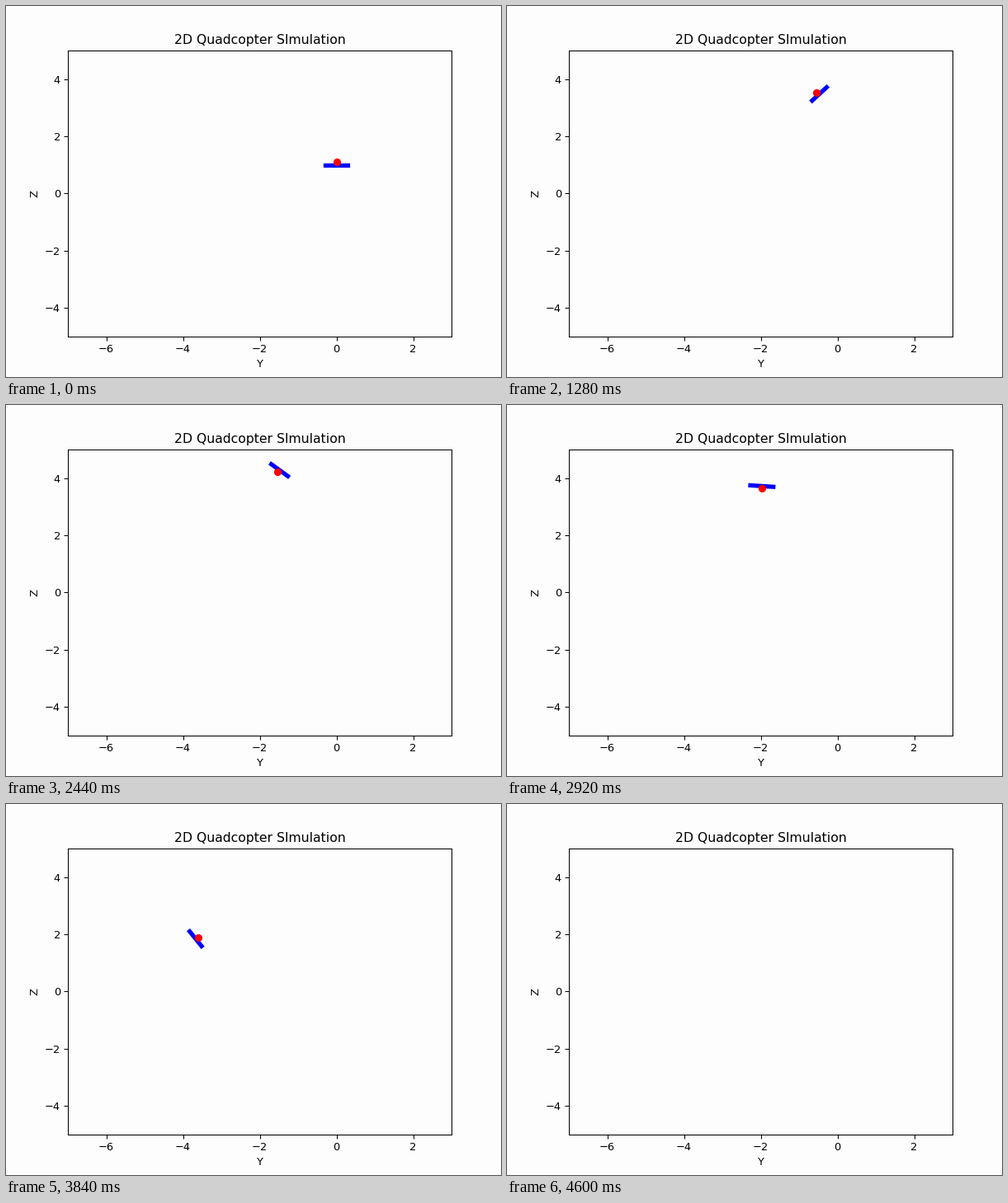
A matplotlib script for the animation above (5200 ms loop, 600 by 450 pixels).

```python
import numpy as np
import matplotlib.pyplot as plt
from matplotlib.animation import FuncAnimation

INTERVAL = 40
FRAMES = 130
PAPER = "#fefdfe"
HALF_SPAN = 0.3
HUB_OFFSET = 0.09

# Key poses: time (s), y, z, pitch (degrees)
KEYS = np.array([
    (0.00, 0.00, 1.00, 0),
    (0.60, -0.04, 1.68, 8),
    (1.28, -0.47, 3.48, 51),
    (1.96, -1.03, 4.37, 100),
    (2.92, -1.97, 3.72, 175),
    (3.36, -2.44, 2.93, 216),
    (3.84, -3.67, 1.84, 301),
    (4.60, -7.45, -1.50, 376),
])
times, states = KEYS[:, 0], KEYS[:, 1:]
slopes = np.gradient(states, times, axis=0)
slopes[0] = 0  # starts at rest


def pose(t):
    """Smooth y, z and pitch at time t (cubic Hermite between key poses)."""
    t = min(t, times[-1])
    k = min(np.searchsorted(times, t, side="right") - 1, len(times) - 2)
    h = times[k + 1] - times[k]
    s = (t - times[k]) / h
    ease = s * s * (3 - 2 * s)
    return (states[k] + ease * (states[k + 1] - states[k])
            + h * s * (1 - s) * ((1 - s) * slopes[k] - s * slopes[k + 1]))


fig, ax = plt.subplots(figsize=(6.4, 4.8), dpi=93.75, facecolor=PAPER)
ax.set(xlim=(-7, 3), ylim=(-5, 5), xlabel="Y", ylabel="Z",
       title="2D Quadcopter SImulation", facecolor=PAPER)
body, = ax.plot([], [], color="blue", linewidth=4)
hub, = ax.plot([], [], "o", color="red")


def update(i):
    y, z, pitch = pose(i * INTERVAL / 1000)
    c, s = np.cos(np.radians(pitch)), np.sin(np.radians(pitch))
    arm = np.array([-HALF_SPAN, HALF_SPAN])
    body.set_data(y + arm * c, z + arm * s)
    hub.set_data([y - HUB_OFFSET * s], [z + HUB_OFFSET * c])
    return body, hub


anim = FuncAnimation(fig, update, frames=FRAMES, interval=INTERVAL,
                     repeat=True, repeat_delay=0, blit=False)
plt.show()
```
